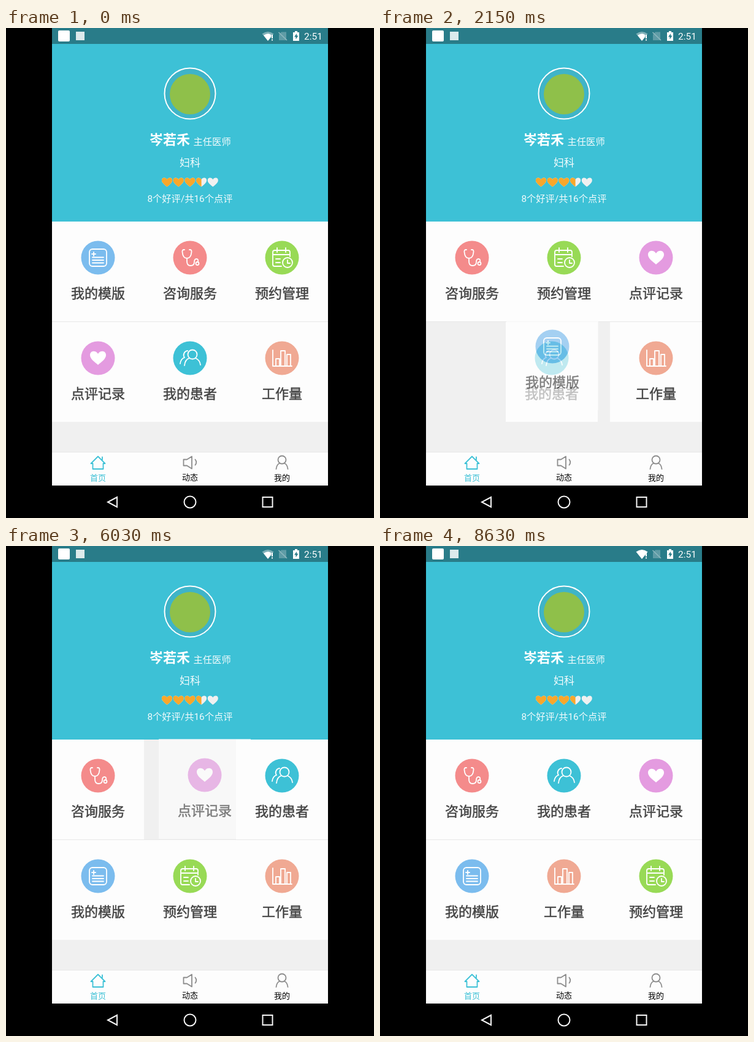
These frames come from a looping animation (600 px wide and 800 px high, 8670 ms). An HTML page:

```html
<!DOCTYPE html>
<html lang="zh-CN">
<head>
<meta charset="utf-8">
<style>
html, body { margin: 0; width: 100%; height: 100%; overflow: hidden; background: #000; }
svg { display: block; width: 100vw; height: 100vh; }
text { font-family: Roboto, "Noto Sans CJK SC", "Noto Sans CJK", sans-serif; }
.mid { text-anchor: middle; }
.line { fill: none; stroke: #fff; stroke-width: 1.8; stroke-linecap: round; stroke-linejoin: round; }
.label { font-size: 22px; fill: #444; stroke: #444; stroke-width: .5; text-anchor: middle; }
.tab { font-size: 13px; text-anchor: middle; }
</style>
</head>
<body>
<svg viewBox="0 0 600 800">
  <defs>
    <clipPath id="screen"><rect x="75" width="450" height="747"/></clipPath>
    <clipPath id="half"><rect x="-14" y="-14" width="14" height="28"/></clipPath>
    <path id="heart" d="M0 11C-6 6-13 1-13-5C-13-13-3-13 0-7C3-13 13-13 13-5C13 1 6 6 0 11Z"/>
  </defs>
  <rect width="600" height="800"/>
  <rect x="75" width="450" height="747" fill="#f0f0f0"/>
  <rect x="75" width="450" height="26" fill="#297c89"/>
  <rect x="75" y="26" width="450" height="290" fill="#3dc1d6"/>

  <g fill="#fff">
    <rect x="85" y="4" width="19" height="18" rx="2"/>
    <rect x="114" y="6" width="14" height="14" fill="#dceaec"/>
    <path id="wifiBack" d="M417.500 9.500Q427 2.500 436.500 9.500L427 21Z" fill="#7fb0b8"/>
    <path d="M420 12Q427 7 432 11V15L427 21Z"/>
    <path d="M433 11h2v6h-2zm0 7.500h2v2h-2z"/>
    <path d="M449 6.500h8V20h-12V10.500z" fill="#5f9ca6"/>
    <path d="M444.500 7L458 20" stroke="#8fb9c0" stroke-width="1.500"/>
    <path d="M468 7h3v-2h4v2h3v14h-10z"/>
    <path d="M474 9l-4 5.500h2.500v4l4-6h-2.500z" fill="#297c89"/>
    <text x="486" y="19" font-size="15.500">2:51</text>
  </g>

  <circle cx="300" cy="107" r="41.500" fill="#3fb4c8" stroke="#fff" stroke-width="2"/>
  <circle cx="300" cy="108" r="33" fill="#8fc04a"/>
  <g fill="#f4fbfc">
    <text x="234" y="190" font-size="22" font-weight="700" fill="#fff">岑若禾</text>
    <text x="305.500" y="190.500" font-size="15.300">主任医师</text>
    <text class="mid" x="300" y="226" font-size="17">妇科</text>
    <g id="rating"></g>
    <text class="mid" x="300" y="284" font-size="15.300">8个好评/共16个点评</text>
  </g>

  <path d="M75 479.500H525" stroke="#e8e8e8"/>
  <g id="grid" clip-path="url(#screen)"></g>

  <rect x="75" y="692" width="450" height="55" fill="#fdfdfd"/>
  <path d="M75 692.500H525" stroke="#e8e8e8"/>
  <g class="line">
    <path d="M138.500 711L150 699.500L161.500 711H158.500V720H141.500V711ZM157 705V700.500" style="stroke:#3dc1d6"/>
    <g style="stroke:#8c8c8c">
      <path d="M289.500 704.500H295L303 699.500V719.500L295 714.500H289.500ZM308.500 704.500q3.500 4.500 0 9"/>
      <circle cx="450" cy="705" r="6.500"/>
      <path d="M440.500 720q1-8 6-9.500M453.500 710.500q5 1.500 6 9.500"/>
    </g>
    <g style="stroke:#f6f6f6;stroke-width:2;stroke-linejoin:miter">
      <path d="M181 766v16L166 774Z"/>
      <circle cx="300" cy="774" r="9.500"/>
      <rect x="418.500" y="766" width="16" height="16"/>
    </g>
  </g>
  <text class="tab" x="150" y="739" fill="#3dc1d6">首页</text>
  <text class="tab" x="300" y="738">动态</text>
  <text class="tab" x="450" y="739">我的</text>
</svg>

<script>
const LOOP = 8670, SLIDE = 300;
const $ = id => document.getElementById(id);
const path = d => `<path d="${d}"/>`;
const circle = (x, y, r) => `<circle cx="${x}" cy="${y}" r="${r}"/>`;

const items = [
  ['我的模版', '#7bbcee', '<rect x="-14" y="-14" width="28" height="28" rx="5"/>' +
    path('M-10-6h6M-7-9v6M-9-.5h18M-9 4h18M-9 8.500h18')],
  ['咨询服务', '#f48b8b', path('M-9-13h-1q-3 0-2.500 4q1 10 7.500 10t7.500-10q.5-4-2.500-4h-1M-5 1v5q0 7 6 7t6-6q0-5 3.500-5t2.500 5') +
    circle(12, 9.5, 2.5)],
  ['预约管理', '#98da56', path('M-1 14h-11q-3 0-3-3v-20q0-3 3-3h22q3 0 3 3v7M-15-5h28M-8-16v7M6-16v7M-10 2h7M-10 8h7M9 4v5h4') +
    circle(9, 8, 8)],
  ['点评记录', '#e49be0', '<use href="#heart" fill="#fff" stroke="none"/>'],
  ['我的患者', '#3dc1d6', circle(4, -6, 7.5) +
    path('M-9 12q1-10 8-12M9 0q7 3 8 11M-4-12a7 7 0 0 0-5 11M-16 9q1-8 7-10')],
  ['工作量', '#f0a993', path('M-15-13v26h31M-10 13v-12h6v12M-2 13v-25h7v25M8 13v-19h6v19')]
];

// path: [time, dx, dy] from the picked slot; moves: [time, slot the tile enters]
const drags = [
  { item: 0, path: [[1070, 0, 0], [1250, 4, 6], [1650, 42, 67], [2250, 148, 160], [2640, 154, 170]],
    moves: [[1760, 3], [2080, 4]] },
  { item: 2, path: [[3880, 0, 0], [3980, 2, 20], [4340, 9, 170], [4460, 11, 181], [4620, 11, 182]],
    moves: [[4120, 4]] },
  { item: 3, path: [[5700, 0, 0], [5850, 3, 0], [6030, 24, -1], [6380, 140, 0], [6560, 150, 1]],
    moves: [[6180, 2]] },
  { item: 2, path: [[7640, 0, 0], [7780, 6, 0], [8260, 140, 2], [8460, 150, 3]],
    moves: [[8030, 5]] }
];

const slotX = s => 75 + s % 3 * 150;
const slotY = s => 316 + Math.floor(s / 3) * 164;
const mix = (a, b, k) => a + (b - a) * k;
const ease = k => .5 - Math.cos(Math.PI * Math.min(1, Math.max(0, k))) / 2;

function along(points, t) {
  const i = Math.max(1, points.findIndex(p => p[0] > t));
  const [a, b] = [points[i - 1], points[i]];
  const k = (t - a[0]) / (b[0] - a[0]);
  return [mix(a[1], b[1], k), mix(a[2], b[2], k)];
}

const tiles = items.map(([name, color, icon]) => {
  const g = document.createElementNS('http://www.w3.org/2000/svg', 'g');
  g.innerHTML = `<rect width="150" height="163" fill="#fdfdfd"/>
    <circle cx="75" cy="59" r="27.500" fill="${color}"/>
    <g class="line" transform="translate(75 59)">${icon}</g>
    <text class="label" x="75" y="125">${name}</text>`;
  $('grid').append(g);
  return g;
});

$('rating').innerHTML = [1, 1, 1, .5, 0].map((fill, i) => {
  const on = fill ? `<use href="#heart" fill="#f9a72b" ${fill < 1 ? 'clip-path="url(#half)"' : ''}/>` : '';
  return `<g transform="translate(${262.5 + i * 18.7} 252) scale(.66)"><use href="#heart" fill="#f0f0f0"/>${on}</g>`;
}).join('');

function render(t) {
  const places = items.map((_, i) => ({ from: i, to: i, since: -SLIDE }));
  let held = null;
  for (const { item, path, moves } of drags) {
    const start = path[0][0], end = path[path.length - 1][0];
    if (t < start) break;
    const home = places[item].to;
    for (const [time, slot] of moves) {
      if (t < time) break;
      const old = places[item].to, step = Math.sign(slot - old);
      for (const p of places) {
        if ((p.to - old) * step > 0 && (slot - p.to) * step >= 0)
          Object.assign(p, { from: p.to, to: p.to - step, since: time });
      }
      Object.assign(places[item], { from: slot, to: slot });
    }
    if (t < end) {
      const [dx, dy] = along(path, t);
      held = { item, x: slotX(home) + dx, y: slotY(home) + dy };
    }
  }
  places.forEach((p, i) => {
    const k = ease((t - p.since) / SLIDE), mine = held && held.item === i;
    const x = mine ? held.x : mix(slotX(p.from), slotX(p.to), k);
    const y = mine ? held.y : mix(slotY(p.from), slotY(p.to), k);
    tiles[i].setAttribute('transform', `translate(${Math.round(x)} ${Math.round(y)})`);
    tiles[i].setAttribute('opacity', mine ? .68 : 1);
  });
  if (held && $('grid').lastChild !== tiles[held.item]) $('grid').append(tiles[held.item]);
  $('wifiBack').setAttribute('fill', t >= 8550 ? '#fff' : '#7fb0b8');
}

const began = performance.now();
(function tick() {
  render((performance.now() - began) % LOOP);
  requestAnimationFrame(tick);
})();
</script>
</body>
</html>
```
